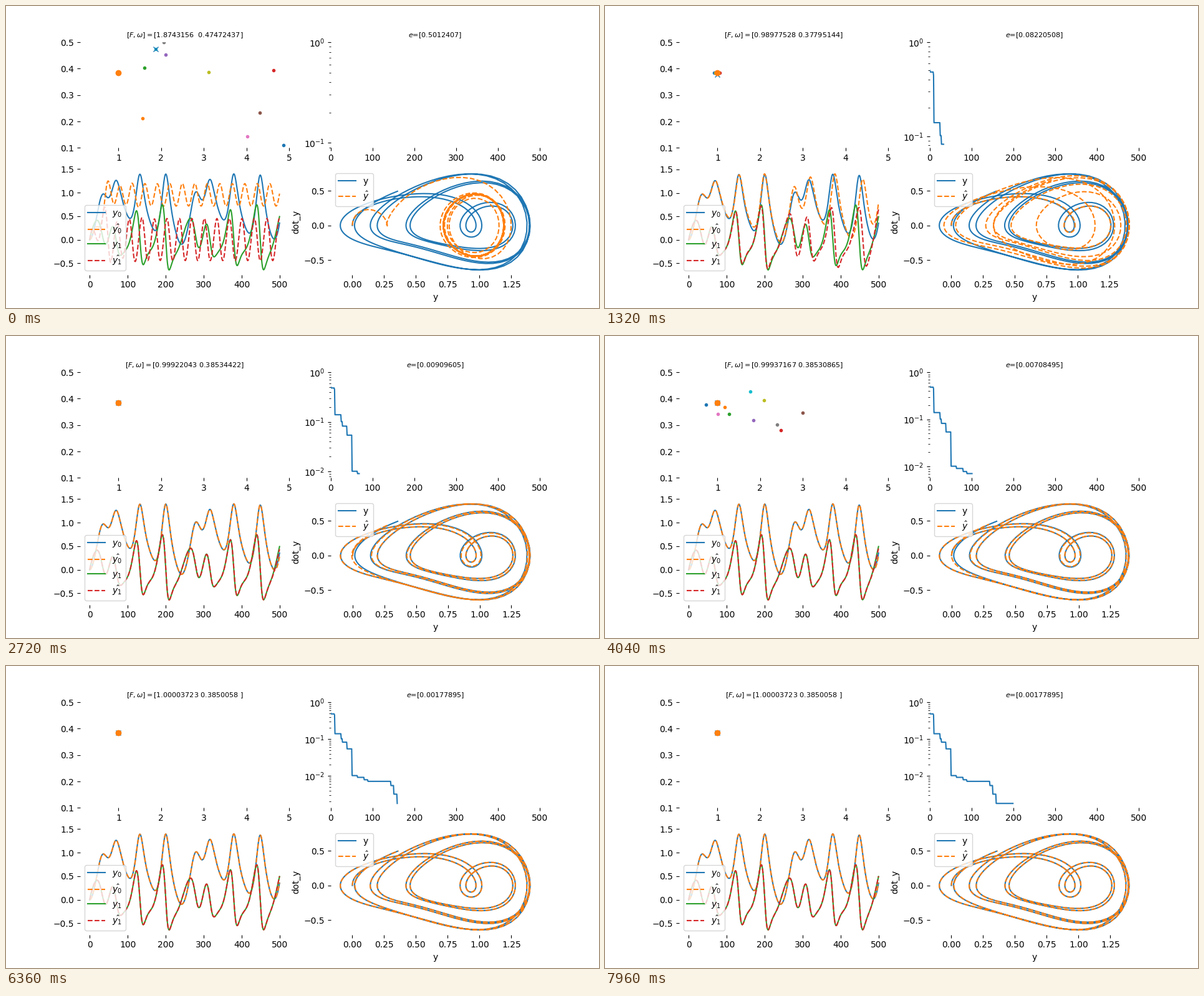
A matplotlib script that plays this animation: 951 by 484 pixels, repeating every 8 s.

```python
import numpy as np
import matplotlib.pyplot as plt
from matplotlib.animation import FuncAnimation

FRAMES, STEP_MS, SAMPLES = 200, 40, 500
TRUE = np.array([1.0, 0.385])
LOW, HIGH = np.array([0.1, 0.1]), np.array([5.0, 0.5])
RESTARTS = [0, 92, 160]
rng = np.random.default_rng(7)

# iteration, drive frequency, drive force, error
BEST = np.array([
    (0, 1.8743156, 0.47472437, 0.5012407),
    (10, 1.0029481, 0.37566583, 0.13943424),
    (28, 0.98977528, 0.37795144, 0.08220508),
    (64, 0.99922043, 0.38534422, 0.00909605),
    (89, 0.99937167, 0.38530865, 0.00708495),
    (159, 1.00003723, 0.3850058, 0.00177895),
])
# smaller gains: iteration -> share of the way to the next best
GAINS = {1: .03, 9: .09, 25: .6, 39: .19, 51: .95, 80: .6, 144: .19, 151: .58}

# (sample, y) turning points used to fit the oscillator's constants
TRUE_TURNS = np.array([
    (38, .985), (103, .465), (131, 1.41), (172, .195), (200, 1.41), (243, -.09),
    (282, 1.02), (349, .445), (420, .145), (449, 1.39), (487, .02), (499, .355)])
FIRST_TURNS = np.array([(24, .262), (49, 1.25)])


def simulate(model, freq, force, count=SAMPLES):
    """RK4 run of a driven double-well oscillator from rest: (count, 2, n)."""
    damp, lead, dt, lin = model

    def rate(t, s):
        y, v = s
        drive = force * np.cos(freq * (t + lead))
        return np.array([v, lin * y - y * y * y - damp * v + drive])

    s = np.zeros((2,) + np.broadcast(damp, freq).shape)
    out = [s]
    for i in range(count - 1):
        t = i * dt
        k1 = rate(t, s)
        k2 = rate(t + dt / 2, s + dt / 2 * k1)
        k3 = rate(t + dt / 2, s + dt / 2 * k2)
        k4 = rate(t + dt, s + dt * k3)
        s = s + dt / 6 * (k1 + 2 * k2 + 2 * k3 + k4)
        out.append(s)
    return np.array(out)


def misfit(models, params, turns):
    at = turns[:, 0].astype(int)
    y = simulate(models.T, *params, count=at[-1] + 1)[at, 0]
    return np.abs(y - turns[:, 1:]).mean(axis=0)


def calibrate(rounds=12, size=2000, keep=30):
    """Narrowing random search for damping, drive lead, time step, stiffness."""
    centre = np.array([0.5, 0, 0.1, 1])
    scale = np.array([0.08, 0.03, 0.0008, 0.03])
    spread = scale
    pool = centre + spread * rng.normal(size=(size, 4))
    for _ in range(rounds):
        cost = misfit(pool, TRUE, TRUE_TURNS)
        cost += 0.3 * misfit(pool, BEST[0, 1:3], FIRST_TURNS)
        cost += 0.002 * (((pool - centre) / scale) ** 2).mean(axis=1)
        elite = pool[np.argsort(cost)[:keep]]
        spread = spread * 0.65
        picks = elite[rng.integers(keep, size=size)]
        pool = np.vstack([elite, picks + spread * rng.normal(size=(size, 4))])
    return elite[0]


def best_history():
    rows = list(BEST)
    for it, share in GAINS.items():
        k = np.searchsorted(BEST[:, 0], it)
        a, b = BEST[k - 1], BEST[k]
        row = a + share * (b - a)
        row[0], row[3] = it, a[3] * (b[3] / a[3]) ** share
        rows.append(row)
    return np.array(sorted(rows, key=lambda r: r[0]))


best = best_history()
stage = np.searchsorted(best[:, 0], np.arange(FRAMES), side="right") - 1
error = best[stage, 3]

freqs, forces = np.vstack([best[:, 1:3], TRUE]).T
paths = simulate(calibrate(), freqs, forces)
real = paths[:, :, -1]

starts = rng.uniform(LOW, HIGH, (len(RESTARTS), 10, 2))
starts[0, -1] = BEST[0, 1:3]
sway = rng.uniform(0, 0.12, starts.shape)


def swarm(n):
    """Particles swing in towards the optimum after each restart."""
    k = np.searchsorted(RESTARTS, n, side="right") - 1
    age = n - RESTARTS[k]
    pull = np.exp(-(age / np.array([14, 11])) ** 1.5)
    return np.clip(TRUE + (starts[k] - TRUE) * pull * np.cos(sway[k] * age), LOW, HIGH)


for side in ("left", "right", "top", "bottom"):
    plt.rcParams["axes.spines." + side] = False
fig, ((ax_par, ax_err), (ax_time, ax_phase)) = plt.subplots(
    2, 2, figsize=(9.51, 4.84), dpi=100)
fig.subplots_adjust(left=.125, right=.9, bottom=.11, top=.88, wspace=.2, hspace=.2)

dots = [ax_par.plot([], [], ".", color=f"C{i}")[0] for i in range(10)]
best_mark, = ax_par.plot([], [], "x", color="C0")
ax_par.plot(*TRUE, "o", color="C1")
ax_par.set(xlim=(LOW[0], HIGH[0]), ylim=(LOW[1], HIGH[1]))
par_title = ax_par.set_title("", fontsize=8)

err_line, = ax_err.semilogy([0], [error[0]], color="C0")
ax_err.set_xlim(0, 500)
err_title = ax_err.set_title("", fontsize=8)

sample = np.arange(SAMPLES)
guess = []
for i in range(2):
    ax_time.plot(sample, real[:, i], color=f"C{2 * i}", label=f"$y_{i}$")
    guess += ax_time.plot(sample, real[:, i], "--", color=f"C{2 * i + 1}",
                          label=rf"$\hat{{y_{i}}}$")
ax_time.legend(loc="best")

ax_phase.plot(*real.T, color="C0", label="y")
orbit, = ax_phase.plot(*real.T, "--", color="C1", label=r"$\hat{y}$")
ax_phase.set(xlabel="y", ylabel="dot_y")
ax_phase.legend(loc="upper left")


def draw(n):
    k = stage[n]
    params, e = best[k, 1:3], error[n]
    best_mark.set_data(params[:1], params[1:])
    for dot, (x, y) in zip(dots, swarm(n)):
        dot.set_data([x], [y])
    par_title.set_text(rf"$[F,\omega]=${params}")

    err_line.set_data(np.arange(n + 1), error[:n + 1])
    bottom = e * (e / error[0]) ** 0.05 if n else 10 ** -1.05
    ax_err.set_ylim(bottom, 1)
    err_title.set_text(f"$e$={np.array([e])}")

    path = paths[:, :, k]
    for i, line in enumerate(guess):
        line.set_ydata(path[:, i])
    orbit.set_data(*path.T)
    for ax in (ax_time, ax_phase):
        ax.relim()
        ax.autoscale_view()
    return []


anim = FuncAnimation(fig, draw, frames=FRAMES, interval=STEP_MS, repeat=True)
plt.show()
```
